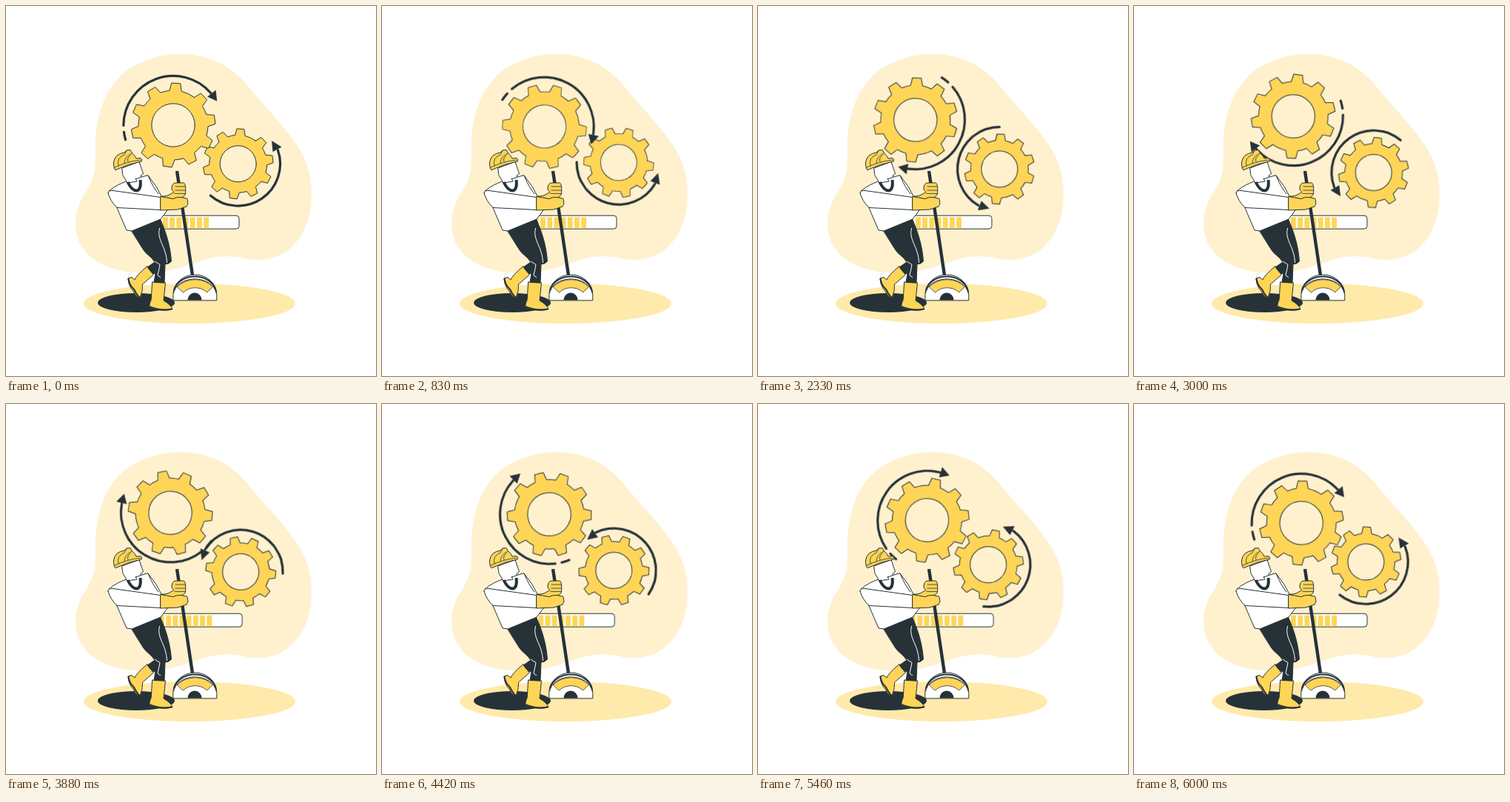
An HTML page for the animation above (6040 ms loop, 500 px wide and 500 px high).

```html
<!DOCTYPE html>
<html lang="en">
<head>
<meta charset="utf-8">
<title>Worker pulling a lever</title>
<style>
  html, body { margin: 0; width: 100%; height: 100%; overflow: hidden; background: #fff; }
  svg { display: block; width: 100vw; height: 100vh; }
  /* non-scaling strokes keep rotating outlines sharp */
  .line, .arrow { vector-effect: non-scaling-stroke; stroke: #263238; stroke-linejoin: round; stroke-linecap: round; }
  .line { stroke-width: 1; }
  .thin { stroke-width: .8; }
  .thick { stroke-width: 2; }
  .yellow { fill: #ffd557; }
  .cream { fill: #fff1ce; }
  .white { fill: #fff; }
  .dark { fill: #263238; }
  .none { fill: none; }
  .arrow { fill: none; stroke-width: 3.2; }
  .spin { animation: spin 6.04s linear infinite; }
  #big { transform-origin: 220.7px 155px; }
  #small { transform-origin: 318.7px 219.2px; }
  #bar { animation: shake 1.51s cubic-bezier(.36, -.01, .5, 1.38) infinite; }
  @keyframes spin { to { transform: rotate(360deg); } }
  @keyframes shake {
    10%, 90% { transform: translateX(-1px); }
    20%, 80% { transform: translateX(2px); }
    30% { transform: translateX(-2px); }
    50%, 70% { transform: translateX(-4px); }
    40%, 60% { transform: translateX(4px); }
  }
</style>
</head>
<body>
<svg viewBox="0 0 500 500">
  <path class="cream" d="M232 65C281 64 309 86 330 112C354 142 389 174 404 208C418 242 415 285 398 311C381 338 352 348 322 341C284 332 262 347 226 356C187 366 137 361 112 337C90 316 89 282 104 258C119 234 121 226 121 196C120 164 126 131 147 103C165 80 198 66 232 65Z"/>
  <ellipse cx="248" cy="402" rx="143" ry="27" fill="#ffeaab"/>
  <ellipse class="dark" cx="176" cy="401" rx="52" ry="13"/>

  <g id="small" class="spin">
    <path class="gear line yellow"/>
    <circle class="line cream" cx="313.7" cy="213.3" r="24.5"/>
    <path class="arrow arc"/>
    <path class="dark" d="M359 182L360.5 197L372.5 190.5Z"/>
  </g>
  <g id="big" class="spin">
    <path class="gear line yellow"/>
    <circle class="line cream" cx="226" cy="161" r="29.2"/>
    <path class="arrow arc"/>
    <path class="arrow dash"/>
    <path class="dark" d="M272 122.5L283.5 113.5L285.2 128.5Z"/>
  </g>

  <g id="bar">
    <rect class="line white" x="180" y="283.2" width="135" height="18" rx="4"/>
    <g id="cells" class="yellow"></g>
  </g>

  <!-- lever and base -->
  <path d="M231 223L252.3 366" fill="none" stroke="#263238" stroke-width="4.4"/>
  <path class="line white" d="M225.8 397.5V390A29.5 27 0 0 1 284.8 390V397.5Z"/>
  <path class="line thick none" d="M227 384A29 24 0 0 1 283.5 384"/>
  <path class="line none" d="M226.500 388A29 22 0 0 1 284 388"/>
  <path class="line thin yellow" d="M231.500 379.500A31 27 0 0 1 279.500 379.500L271.500 387A21 18 0 0 0 239.500 387Z"/>
  <path class="dark" d="M245.500 397.5A9.5 10 0 0 1 264.5 397.5Z"/>

  <!-- legs -->
  <path class="line yellow" d="M190.500 352L199.500 363L184.500 376Q185 386 181 394.500Q176 394 172.500 386Q165 378 165 368L170 366.500L174 370Q176 364 190.500 352Z"/>
  <path class="line thick none" d="M165.500 368.500Q166 376 173 383Q177 391 180.500 394"/>
  <path class="line yellow" d="M198 373L215.500 374L213 398Q223 404 225 409.500Q214 414 194 408Q193 403 196 397Z"/>
  <path class="line thick none" d="M194.500 406.500Q210 412.500 224 409.500"/>
  <path class="line dark" d="M170 304L208.500 288C215 303 222 322 223.500 345Q220 349 215 349L214 374L200 373.500L202 361L198.500 362L191 353L201 346C196 338 188 335 184 327Z"/>
  <path class="none" stroke="#fff" d="M207.500 300C203 316 217 325 217.500 347M201 345L208 349.500L205 364L209 367"/>

  <!-- torso and head -->
  <path class="line white" d="M192 229L203 244L210 257L224 258L218 276L209 288L170 304L163 303L150 273L139 250Q150 241 163 237Z"/>
  <path class="line white" d="M157 219L180 210.500L182.500 218L185.500 226.500L182.500 228.500Q182.500 233 175 233.500L177 237L164 239L158 229Z"/>
  <path class="none" stroke="#263238" stroke-width="4" d="M164.500 238Q170 249.500 176.500 249.500Q183 248.500 181.500 235"/>
  <path class="line none" d="M192 229Q198 244 206 254"/>

  <!-- arms and gloves -->
  <path class="line yellow" d="M209 258L219 256L227 251.500L224 248Q223.500 239 230 239L240.500 239Q243.500 241 242.500 254Q241 258.500 235 259L222 262Z"/>
  <path class="line thin none" d="M229 244H242M229 249H242.500M228 253.500H242"/>
  <path class="line white" d="M138 253Q137 249 145 249.500L209 258.500V275.500L150 272.500Q141 264 138 253Z"/>
  <path class="line yellow" d="M209 257.500L226 260.500Q230 258 236 258.500L244.500 260Q247.500 266 244 271L232 275L209 276Z"/>

  <!-- helmet -->
  <path class="line yellow" d="M148 221.500Q145 219 145.500 211Q147 200 160 198L163 195L168 194.500L170.500 199Q174.500 202 176 206L182 205.500Q185 207.500 183 210Q166 213 148 221.500Z"/>
  <path class="line thin none" d="M146 218.500Q163 210 182 208M152 216Q149 205 160 201L163 195M160 212.500Q160 203 170.500 199M165 210.500Q163 205 168 202"/>
</svg>
<script>
  const rad = Math.PI / 180;
  const at = (c, r, deg) =>
    (c.x + r * Math.cos(deg * rad)).toFixed(2) + ' ' + (c.y + r * Math.sin(deg * rad)).toFixed(2);

  // ten teeth, with one slightly wider gap where the ring closes
  function gearPath(c, outer, root) {
    const first = -43, step = 35.2, tip = 6, foot = 10;
    let d = '';
    for (let i = 0; i < 10; i++) {
      const a = first + i * step;
      const start = at(c, root, a - foot);
      d += (i ? `A${root} ${root} 0 0 1 ${start}` : `M${start}`) +
        `L${at(c, outer, a - tip)}L${at(c, outer, a + tip)}L${at(c, root, a + foot)}`;
    }
    return d + `A${root} ${root} 0 0 1 ${at(c, root, first - foot)}Z`;
  }

  const arc = (c, r, from, to, dir) =>
    `M${at(c, r, from)}A${r} ${r} 0 0 ${dir} ${at(c, r, to)}`;

  const draw = (sel, d) => document.querySelector(sel).setAttribute('d', d);

  const big = { x: 226, y: 161 }, small = { x: 313.7, y: 213.3 };
  const ring = { x: 226, y: 161.6 };
  draw('#big .gear', gearPath(big, 57, 47));
  draw('#big .arc', arc(ring, 67.2, 180, 319, 1));
  draw('#big .dash', arc(ring, 67.2, 172.5, 163.5, 0));
  draw('#small .gear', gearPath(small, 47.5, 39));
  draw('#small .arc', arc(small, 56.8, 131, -19, 0));

  let cells = '';
  for (let i = 0; i < 9; i++)
    cells += `<rect x="${(267.2 - i * 9.2).toFixed(1)}" y="285.5" width="6.8" height="15"/>`;
  document.getElementById('cells').innerHTML = cells;
</script>
</body>
</html>
```
